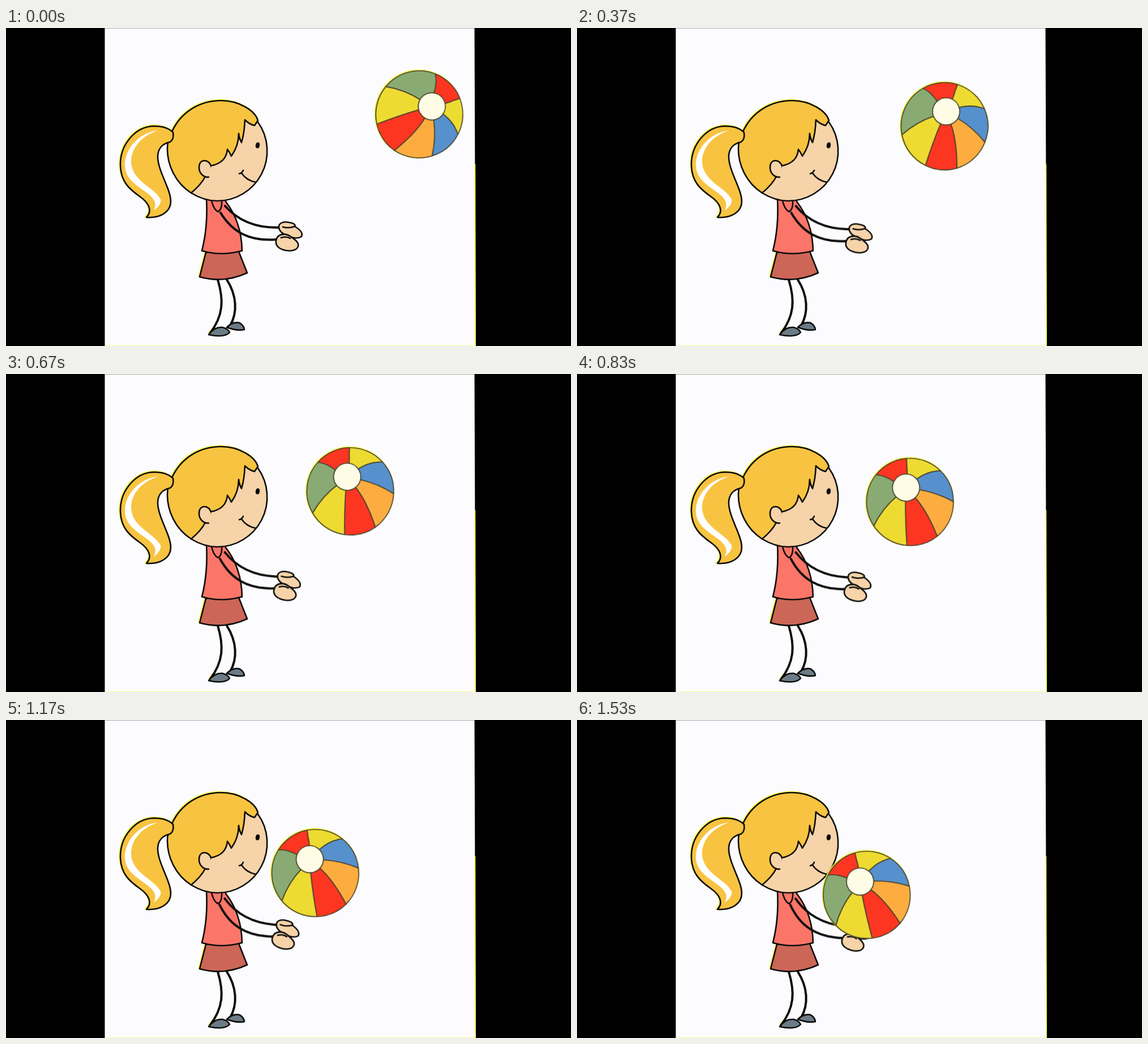
An HTML page without scripts that plays this animation: 998x561 px, repeating every 1630 ms.

```html
<!DOCTYPE html>
<html lang="en">
<head>
<meta charset="utf-8">
<title>Girl catching a beach ball</title>
<style>
  html, body { margin: 0; width: 100%; height: 100%; overflow: hidden; background: #000; }
  svg { display: block; width: 100vw; height: 100vh; }

  .soft { filter: blur(.5px); }
  .ink { stroke: #0b0b0b; stroke-width: 2.6; stroke-linejoin: round; stroke-linecap: round; }
  .limb { fill: none; stroke-width: 4; }
  .line { fill: none; }
  .hair { fill: #f8c340; }
  .skin { fill: #f6d3a8; }
  .shirt { fill: #fb7668; }
  .skirt { fill: #cc6657; }
  .shoe { fill: #6c7c87; }
  .glow { fill: none; stroke: #ffff3c; stroke-width: 2.6; }

  .seam { stroke: #45402c; stroke-width: 1.7; stroke-linejoin: round; }
  .red { fill: #fd3621; }
  .yellow { fill: #eedb32; }
  .green { fill: #89ab73; }
  .blue { fill: #5690cd; }
  .orange { fill: #fdad40; }
  .cream { fill: #fefce4; }

  /* 30 pictures a second: each stretch is cut into that many steps */
  .ball, .spin, .arm { animation: 1630ms -4ms infinite; }
  .ball { animation-name: fly; }
  .spin { animation-name: spin; }
  .arm { animation-name: lower; transform-origin: 375px 308px; }

  @keyframes fly {
    0%      { transform: translate(730px, 152.5px); animation-timing-function: steps(3); }
    6.135%  { transform: translate(704.5px, 154.3px); animation-timing-function: steps(4); }
    14.315% { transform: translate(674.5px, 161px); animation-timing-function: steps(5); }
    24.54%  { transform: translate(643px, 176.4px); animation-timing-function: steps(4); }
    32.72%  { transform: translate(623.3px, 194px); animation-timing-function: steps(4); }
    40.9%   { transform: translate(608.3px, 207px); animation-timing-function: steps(9); }
    59.305% { transform: translate(572.5px, 240.7px); animation-timing-function: steps(6); }
    71.575% { transform: translate(546.5px, 270px); animation-timing-function: steps(11); }
    94.07%, 100% { transform: translate(512px, 308.5px); }
  }
  @keyframes spin {
    0%      { transform: rotate(66deg); animation-timing-function: steps(3); }
    6.135%  { transform: rotate(49.2deg); animation-timing-function: steps(4); }
    14.315% { transform: rotate(30deg); animation-timing-function: steps(5); }
    24.54%  { transform: rotate(11.1deg); animation-timing-function: steps(4); }
    32.72%  { transform: rotate(0deg); animation-timing-function: steps(4); }
    40.9%   { transform: rotate(-3.6deg); animation-timing-function: steps(9); }
    59.305% { transform: rotate(-9.8deg); animation-timing-function: steps(6); }
    71.575% { transform: rotate(-13.3deg); animation-timing-function: steps(11); }
    94.07%, 100% { transform: rotate(-18.3deg); }
  }
  @keyframes lower {
    0% { transform: rotate(0deg); animation-timing-function: steps(46); }
    94.07%, 100% { transform: rotate(6.8deg); }
  }
</style>
</head>
<body>
<svg viewBox="0 0 998 561">
  <defs>
    <path id="tail" d="M295 184C287 176 274 173 261 173C228 174 201 206 202 243C203 272 219 285 236 297C253 309 259 323 248 334C273 336 291 324 291 306C291 284 269 254 268 228C268 211 277 204 290 201C296 197 296 190 295 184Z"/>
    <path id="hair" d="M327 291C299 273 285 242 285 213C285 201 288 192 293 183C309 148 342 128 380 128C412 128 440 146 445 163L439 172Q430 170 422 162Q421 186 416 202Q412 195 411 186Q411 208 398 226Q395 219 391 214Q389 238 362 243L352 262Q345 276 327 291Z"/>
    <path id="skirt" d="M353 396L342 439Q385 451 426 432L411 394Z"/>
  </defs>

  <!-- panel -->
  <path fill="#fcfcfe" d="M174.5 0H827.5L829.5 561H174.5Z"/>
  <path class="line" stroke="#a9a9ae" d="M174.5 .5H827"/>
  <path class="line" stroke="#fbfb8c" d="M176 560.5H829"/>
  <path class="line" stroke="#f6f632" stroke-width="1.5" d="M828.5 240L829.3 561"/>

  <g class="soft">
    <!-- pale fringe on the upper left edges -->
    <g class="glow" transform="translate(-1.3 -1.3)">
      <use href="#tail"/>
      <path d="M293 183C309 148 342 128 380 128C412 128 440 146 445 163"/>
      <use href="#skirt"/>
      <path d="M381 490C381 508 372 526 359 540"/>
    </g>

    <!-- legs -->
    <g class="ink">
      <path class="limb" d="M390 444C408 472 409 502 396 525"/>
      <path class="limb" d="M374 444C385 480 384 508 360 539"/>
      <path class="shoe" d="M390 528Q400 518 412 520Q420 524 421 532Q408 535 390 528Z"/>
      <path class="shoe" d="M358 541Q368 527 382 528Q392 530 395 537Q386 547 358 541Z"/>
    </g>

    <!-- body -->
    <g class="ink">
      <use href="#skirt" class="skirt"/>
      <path class="shirt" d="M354 300Q357 350 346 393Q380 403 417 393Q416 342 388 306V300Z"/>
      <path class="shirt" d="M363 304Q366 319 374 324Q382 321 381 304"/>
    </g>

    <!-- head -->
    <g class="ink">
      <path class="skin" d="M327 291Q350 305 373 305A88 88 0 0 0 445 166L400 140L310 230Z"/>
      <use href="#hair" class="hair"/>
      <use href="#tail" class="hair"/>
      <path fill="#fff" stroke="none" d="M268 181C236 184 209 213 210 243C211 273 244 283 258 299C265 307 265 314 261 322C270 316 275 307 273 302C262 281 222 270 221 236C221 211 240 190 268 181Z"/>
      <path class="skin" d="M362 243C358 231 341 230 341 246C341 257 350 264 358 263"/>
      <ellipse cx="444.5" cy="207" rx="2.3" ry="4" transform="rotate(10 444.5 207)"/>
      <path class="line" d="M412 257Q417 256 419 251M416 256Q425 269 441 272"/>
    </g>

    <!-- arms -->
    <g class="arm ink">
      <path class="limb" d="M387 314C410 340 440 353 482 352"/>
      <path class="skin" d="M482 352C481 343 492 341 500 343C508 344 512 347 510 350C520 356 525 362 522 368C516 372 506 371 499 367C490 364 483 360 482 352Z"/>
      <path class="line" d="M489 351Q500 354 510 350"/>
      <path class="limb" d="M379 326C400 360 430 377 478 373"/>
      <path class="skin" d="M477 375C479 363 493 361 503 368C510 373 518 378 516 385C514 393 500 395 489 391C480 388 476 382 477 375Z"/>
      <path class="line" d="M486 370Q495 367 502 371"/>
    </g>

    <!-- ball -->
    <g class="ball">
      <circle class="glow" cx="-1" cy="-1" r="77"/>
      <g class="spin seam">
        <path class="yellow" d="M-4-26L1-49L3-77A77 77 0 0 1 60-48Q38-50 17-39Z"/>
        <path class="blue" d="M-4-26L17-39Q38-50 60-48A77 77 0 0 1 76 9Q50-10 20-19Z"/>
        <path class="orange" d="M-4-26L20-19Q50-10 76 9A77 77 0 0 1 40 66Q28 20 10-6Z"/>
        <path class="red" d="M-4-26L10-6Q28 20 40 66A77 77 0 0 1-15 75.5Q-13 35-8-3Z"/>
        <path class="yellow" d="M-4-26L-8-3Q-13 35-15 75.5A77 77 0 0 1-69 34Q-50 5-22-13Z"/>
        <path class="green" d="M-4-26L-22-13Q-50 5-69 34A77 77 0 0 1-54-55Q-38-52-24-39Z"/>
        <path class="red" d="M-4-26L-24-39Q-38-52-54-55A77 77 0 0 1 3-77L1-49Z"/>
        <circle class="cream" cx="-4" cy="-26" r="24"/>
      </g>
    </g>
  </g>
</svg>
</body>
</html>
```
